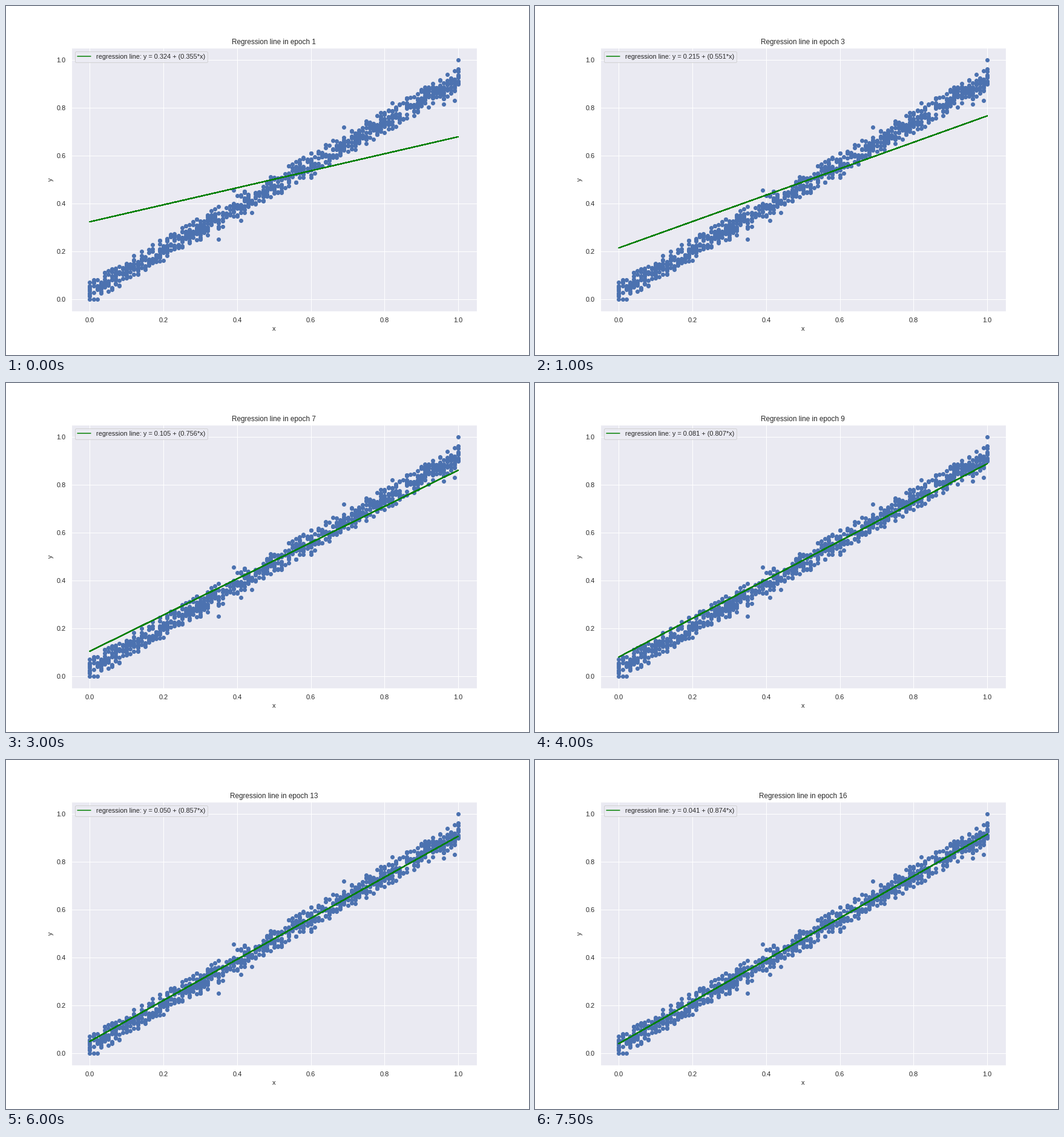
A matplotlib script that plays this animation: 864x576 px, repeating every 8000 ms.

```python
import numpy as np
import matplotlib.pyplot as plt
from matplotlib.animation import FuncAnimation

INK = "0.15"
plt.rcParams.update({
    "font.family": "Liberation Sans",
    "axes.facecolor": "#EAEAF2",
    "axes.edgecolor": "white",
    "axes.linewidth": 1.25,
    "axes.grid": True,
    "axes.axisbelow": True,
    "axes.labelcolor": INK,
    "axes.labelsize": 11,
    "axes.titlesize": 11.8,
    "grid.color": "white",
    "grid.linewidth": 1,
    "text.color": INK,
    "xtick.color": INK,
    "ytick.color": INK,
    "xtick.labelsize": 11,
    "ytick.labelsize": 11,
    "xtick.major.size": 6,
    "ytick.major.size": 6,
    "xtick.bottom": False,
    "ytick.left": False,
    "legend.fontsize": 11,
    "lines.linewidth": 1.5,
    "lines.solid_capstyle": "round",
    "path.simplify": False,
})

EPOCHS = 16
OUTLIERS = [(0.35, 0.25), (0.39, 0.456), (0.41, 0.33), (0.44, 0.362),
            (0.60, 0.509), (0.69, 0.719), (0.82, 0.82), (0.96, 0.815),
            (0.99, 0.83), (1, 1)]


def make_cloud(n=900):
    """Noisy straight line on whole hundredths of x, in shuffled order."""
    rng = np.random.default_rng(12)
    x = rng.integers(0, 101, n) / 100
    noise = np.clip(rng.normal(0, 0.024, n), -0.046, 0.046)
    y = np.maximum(0.03 + 0.89 * x + noise, 0)
    points = np.vstack([np.column_stack([x, y]), OUTLIERS])
    return rng.permutation(points).T


# Key epochs of the training; in between, the gap to the limit decays
KEYS = [1, 5, 7, 9, 13, 16]
BIAS = np.array([0.324, 0.147, 0.105, 0.081, 0.050, 0.041])
SLOPE = np.array([0.355, 0.676, 0.756, 0.807, 0.857, 0.874])


def decay(epoch, values, limit):
    gap = values - limit
    size = np.exp(np.interp(epoch, KEYS, np.log(np.abs(gap))))
    return limit + np.sign(gap[0]) * size


def coefficients(epoch):
    return decay(epoch, BIAS, 0.035), decay(epoch, SLOPE, 0.893)


def describe(b, m):
    return f"regression line: y = {b:.3f} + ({m:.3f}*x)"


x, y = make_cloud()
fig, ax = plt.subplots(figsize=(12, 8), dpi=72)
fig.subplots_adjust(left=0.125, right=0.9, bottom=0.125, top=0.88)

ax.scatter(x, y, s=36, color="#4C72B0", linewidths=1)
line, = ax.plot(x, x, color="green", label=describe(*coefficients(1)))
ax.set(xlim=(-0.05, 1.05), ylim=(-0.05, 1.05), xlabel="x", ylabel="y")
title = ax.set_title("")
legend = ax.legend(loc="upper left")


def update(frame):
    epoch = frame + 1
    b, m = coefficients(epoch)
    line.set_ydata(b + m * x)
    legend.get_texts()[0].set_text(describe(b, m))
    title.set_text(f"Regression line in epoch {epoch}")
    return line, legend, title


anim = FuncAnimation(fig, update, frames=EPOCHS, interval=500,
                     repeat=True, repeat_delay=0, blit=False)
plt.show()
```
